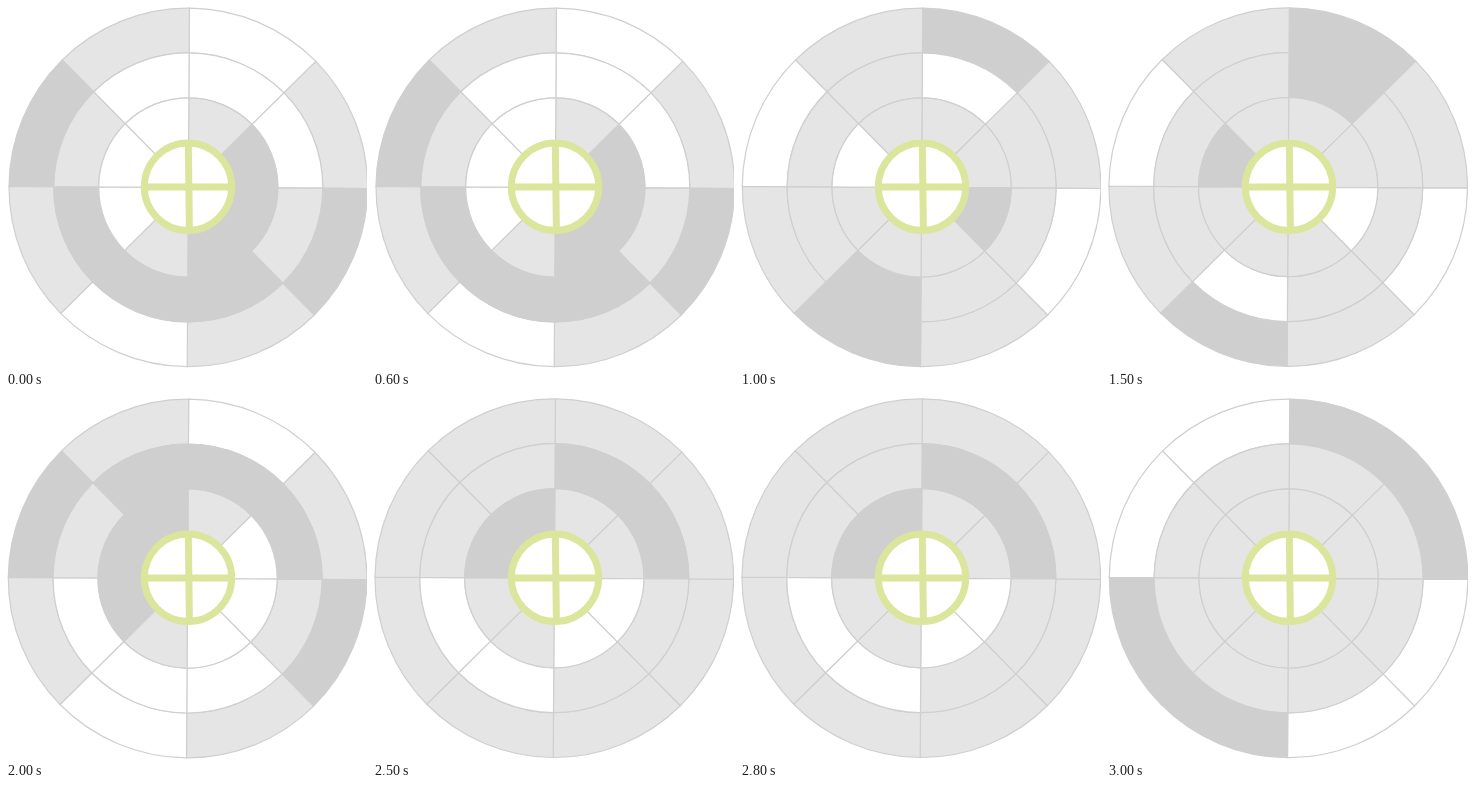
Recreate the animation shown at these times as an HTML page. Size 361 px wide and 363 px high, loop 3500 ms.

```html
<!DOCTYPE html>
<html lang="en">
<head>
<meta charset="utf-8">
<title>Ring pattern</title>
<style>
  html, body { margin: 0; width: 100%; height: 100%; overflow: hidden; background: #fff; }
  svg { display: block; width: 361px; height: 363px; }
  #cells path { stroke: #cfcfcf; stroke-width: 1.2; }
  #hub { fill: #fff; stroke: #dbe69c; stroke-width: 7; }
</style>
</head>
<body>
<svg viewBox="0 0 361 363">
  <g id="cells"></g>
  <g id="hub">
    <circle cx="182" cy="180.8" r="43.7"/>
    <path d="M182.3 137 L183.4 224 M139 181 H225"/>
  </g>
</svg>
<script>
const LOOP = 3500;
const SHADES = ['#ffffff', '#e5e5e5', '#cfcfcf'];
const RADII = [179.3, 134.5, 89.6, 44];
const TILT = 0.35;

// Shade of each sector, clockwise from the top, for the outer, middle and inner ring.
const STEPS = [
  { at: 0,    x: 182.3, y: 181.4, rings: ['01210121', '00122210', '12221000'] },
  { at: 1000, x: 181.6, y: 181.4, rings: ['21012101', '01112111', '11211101'] },
  { at: 1500, x: 181.2, y: 181.1, rings: ['21012101', '21110111', '11011121'] },
  { at: 2000, x: 181.6, y: 181.5, rings: ['01210121', '22100012', '10001222'] },
  { at: 2500, x: 181.3, y: 181.2, rings: ['11111111', '22110011', '11001122'] },
  { at: 3000, x: 181.6, y: 181.4, rings: ['22002200', '11111111', '11111111'] }
];

const group = document.getElementById('cells');

function point(radius, degrees) {
  const a = (degrees + TILT) * Math.PI / 180;
  return `${(radius * Math.sin(a)).toFixed(2)} ${(-radius * Math.cos(a)).toFixed(2)}`;
}

function sector(ring, index) {
  const outer = RADII[ring], inner = RADII[ring + 1];
  const from = index * 45, to = from + 45;
  return `M${point(outer, from)} A${outer} ${outer} 0 0 1 ${point(outer, to)} ` +
    `L${point(inner, to)} A${inner} ${inner} 0 0 0 ${point(inner, from)} Z`;
}

const cells = [];
for (let ring = 0; ring < 3; ring++) {
  for (let i = 0; i < 8; i++) {
    const path = document.createElementNS('http://www.w3.org/2000/svg', 'path');
    path.setAttribute('d', sector(ring, i));
    group.append(path);
    cells.push(path);
  }
}

let shown = null;

function show(time) {
  const step = STEPS.findLast(s => s.at <= time % LOOP);
  if (step === shown) return;
  shown = step;
  group.setAttribute('transform', `translate(${step.x} ${step.y})`);
  const shades = step.rings.join('');
  cells.forEach((cell, i) => cell.setAttribute('fill', SHADES[shades[i]]));
}

const start = performance.now();
function tick() {
  show(performance.now() - start);
  requestAnimationFrame(tick);
}
tick();
</script>
</body>
</html>
```
